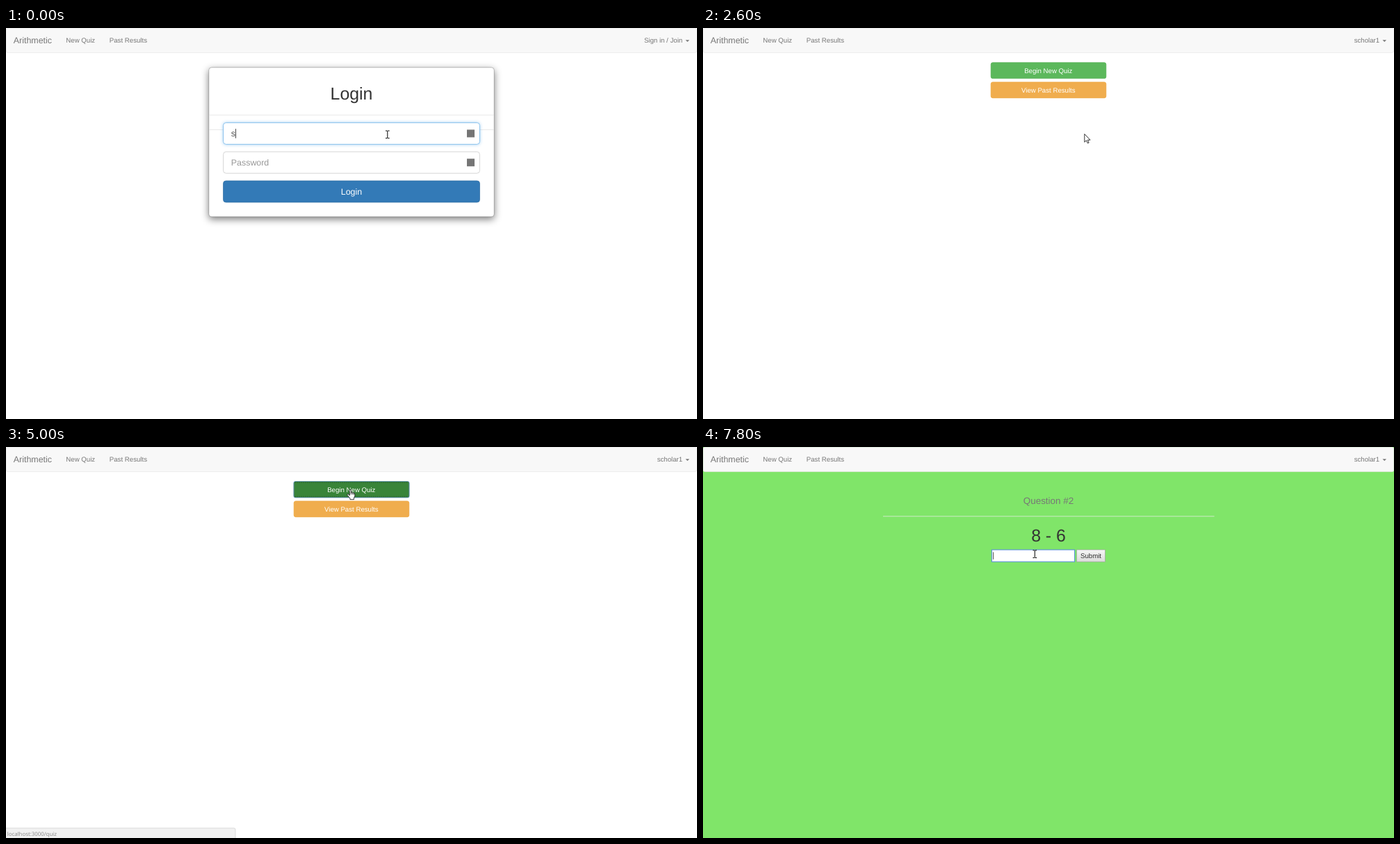
An HTML page for the animation above (8000 ms loop, 994 by 563 pixels).

```html
<!DOCTYPE html>
<html lang="en">
<head>
<meta charset="utf-8">
<title>Arithmetic</title>
<style>
html, body { margin: 0; width: 100%; height: 100%; overflow: hidden; background: #fff; }
svg { display: block; width: 100%; height: 100%; }
text { font-family: "Liberation Sans", Arial, sans-serif; font-size: 9.66px; text-rendering: geometricPrecision; white-space: pre; }
.nav { fill: #777; }
.lg { font-size: 12.42px; }
.h1 { font-size: 24.85px; fill: #333; }
.mid { text-anchor: middle; }
.end { text-anchor: end; }
.white { fill: #fff; }
.field { fill: #555; }
.hint { fill: #999; }
.answer { fill: #333; }
.status { font: 7.85px "Open Sans", "Noto Sans", sans-serif; fill: #858585; }
rect, path { stroke-width: .7; }
</style>
</head>
<body>
<svg viewBox="0 0 994 563">
  <defs>
    <filter id="soft" x="-10%" y="-20%" width="120%" height="140%"><feGaussianBlur stdDeviation="5.2"/></filter>
    <filter id="glow" x="-5%" y="-50%" width="110%" height="200%"><feGaussianBlur stdDeviation="2.7"/></filter>
    <linearGradient id="grey" x2="0" y2="1"><stop stop-color="#f6f6f6"/><stop offset="1" stop-color="#dcdcdc"/></linearGradient>
  </defs>

  <rect id="page" width="994" height="563"/>
  <rect x=".35" y=".35" width="993.3" height="35.2" rx="2.6" fill="#f8f8f8" stroke="#e7e7e7"/>
  <g class="nav">
    <text class="lg" x="10.8" y="22.1">Arithmetic</text>
    <text x="86.3" y="21.4">New Quiz</text>
    <text x="148.8" y="21.4">Past Results</text>
    <text id="account" class="end" x="973.2" y="21.4"></text>
    <path d="M977.5 17.2h5.6l-2.8 2.8z"/>
  </g>

  <g id="login">
    <rect x="291.5" y="60" width="411" height="215.5" rx="4" opacity=".5" filter="url(#soft)"/>
    <rect x="291.8" y="56.8" width="410.4" height="215" rx="4" fill="#fff" stroke="#000" stroke-opacity=".35"/>
    <text class="h1 mid" x="497" y="103">Login</text>
    <path d="M292.2 125.3H701.8M292.2 146.5H701.8" stroke="#e0e0e0"/>
    <g id="user"></g>
    <g id="pass"></g>
    <rect x="312.5" y="220" width="369" height="31" rx="4" fill="#337ab7" stroke="#2e6da4"/>
    <text class="lg white mid" x="497" y="239.8">Login</text>
  </g>

  <g id="home">
    <rect id="begin" x="414.2" y="49.8" width="165.6" height="22.8" rx="2.6"/>
    <g id="ring" fill="none">
      <path d="M416 51.2H578M416 71.2H578" stroke="#205020" stroke-dasharray="1.4 1.4"/>
      <rect x="414" y="49.6" width="166" height="23.2" rx="1.6" stroke="#5b95c8" stroke-width="1"/>
    </g>
    <text class="white mid" x="496.8" y="64.6">Begin New Quiz</text>
    <rect id="view" x="414.2" y="77.9" width="165.6" height="22.8" rx="2.6"/>
    <text class="white mid" x="496.8" y="92.7">View Past Results</text>
  </g>

  <g id="quiz">
    <text id="title" class="nav mid" x="497" y="81.6" style="font-size:13.46px"></text>
    <path d="M259 99.8H735.5" stroke="#eee" stroke-width=".8"/>
    <text id="sum" class="h1 mid" x="497" y="136"></text>
    <rect id="box" x="415.4" y="148" width="119.2" height="17.2" fill="#fff"/>
    <text id="answer" class="answer" x="417.2" y="160"></text>
    <rect x="537.6" y="148" width="40.8" height="17.2" fill="url(#grey)" stroke="#a2a2a2"/>
    <text class="answer mid" x="558" y="160">Submit</text>
  </g>

  <path id="caret" stroke="#333" style="stroke-width:.9"/>
  <g id="status">
    <path d="M-1 564V548.8H328a2 2 0 0 1 2 2V564Z" fill="#f1f1f1" stroke="#cfcfcf"/>
    <text class="status" x="1.8" y="559.6">localhost:3000/quiz</text>
  </g>

  <g id="cursor" stroke="#000">
    <path id="beam" d="M-2.8-5.2H-.7L0-4.6L.7-5.2H2.8M0-4.6V4.9M-2.8 5.5H-.7L0 4.9L.7 5.5H2.8" fill="none" style="stroke-width:1"/>
    <path id="arrow" d="M0 0V11.7L2.7 9.2L4.5 13.3L6.3 12.5L4.6 8.6H8.2Z" fill="#fff" style="stroke-width:.8"/>
    <path id="hand" transform="scale(.69) translate(-7 0)" d="M5.5 13V2a1.5 1.5 0 0 1 3 0V7.5a1.5 1.5 0 0 1 3 0V8a1.4 1.4 0 0 1 2.7.3V9a1.2 1.2 0 0 1 2.3.5V14.5L14.5 18V21.5H6.5V19L1 12.5a1.5 1.5 0 0 1 2.3-2ZM8.5 7.5V11M11.5 8V11M14.2 9V11.5" fill="#fff" style="stroke-width:1.1"/>
  </g>
</svg>
<script>
const LOOP = 8000, STEP = 200, NAME = 'scholar1';
const $ = id => document.getElementById(id);
const show = (id, on) => { $(id).style.display = on ? '' : 'none'; };
const set = (id, attrs) => { for (const k in attrs) $(id).setAttribute(k, attrs[k]); };

// Latest value whose start time has passed
const at = (t, list) => list.reduce((v, [start, value]) => t >= start ? value : v, null);

const userLength = [[0, 1], [200, 3], [400, 5], [600, 7], [1200, 8]];
const passLength = [[0, 0], [1600, 1], [1800, 3], [2000, 4], [2200, 6]];
const pointer = [[0, 'beam'], [2600, 'arrow'], [4200, 'hand'], [5200, 'arrow'], [6200, 'beam']];
const statusAlpha = [[0, 0], [4600, .5], [4800, 1], [5600, .15], [5800, 0]];
const beginColor = [[0, ['#5cb85c', '#4cae4c']], [4400, ['#449d44', '#398439']], [5000, ['#398439', '#255625']]];
const viewColor = [[0, ['#f0ad4e', '#eea236']], [4200, ['#ec971f', '#d58512']], [4400, ['#f0ad4e', '#eea236']]];
const route = [[0, 548.8, 153.2], [3200, 548.8, 152.5], [4000, 455.5, 111.2], [4400, 488, 67],
  [4600, 495.3, 60.8], [5000, 495.3, 60.8], [5200, 495.2, 64.8], [5600, 495.2, 64.8], [6200, 477.3, 154]];

function place(t) {
  const i = route.findIndex(p => p[0] > t);
  if (i < 0) return route[route.length - 1].slice(1);
  const [t0, x0, y0] = route[i - 1], [t1, x1, y1] = route[i];
  const k = (t - t0) / (t1 - t0);
  return [x0 + (x1 - x0) * k, y0 + (y1 - y0) * k];
}

function buildField(id, y) {
  const frame = `x="312.6" y="${y}" width="368.8" height="31" rx="4"`;
  $(id).innerHTML = `<rect id="${id}Glow" ${frame} fill="#66afe9" opacity=".7" filter="url(#glow)"/>
    <rect id="${id}Box" ${frame} fill="#fff"/>
    <text id="${id}Text" class="lg" x="323.8" y="${y + 19.8}"></text>
    <rect x="663" y="${y + 10}" width="11" height="11" fill="#757575"/>`;
}

function drawField(id, value, hint, focus) {
  show(id + 'Glow', focus);
  set(id + 'Box', { stroke: focus ? '#66afe9' : '#c4c4c4' });
  set(id + 'Text', { class: 'lg ' + (value ? 'field' : 'hint') });
  $(id + 'Text').textContent = value || hint;
}

function drawCaret(textId, empty, top, height) {
  const text = $(textId);
  const x = +text.getAttribute('x') + (empty ? 0 : text.getComputedTextLength()) + .5;
  set('caret', { d: `M${x} ${top}v${height}` });
}

function drawLogin(t) {
  const onPass = t >= 1400, dots = at(t, passLength);
  drawField('user', NAME.slice(0, at(t, userLength)), 'Username', !onPass);
  drawField('pass', '•'.repeat(dots), 'Password', onPass);
  if (onPass) drawCaret('passText', !dots, 187, 13.5);
  else drawCaret('userText', false, 145.2, 13.5);
}

function drawHome(t) {
  for (const [id, colors] of [['begin', beginColor], ['view', viewColor]]) {
    const [fill, stroke] = at(t, colors);
    set(id, { fill, stroke });
  }
  show('ring', t >= 5000);
}

function drawQuiz(t) {
  const next = t >= 7800, focus = t >= 6600;
  $('title').textContent = next ? 'Question #2' : 'Question #1';
  $('sum').textContent = next ? '8 - 6' : '8 x 2';
  $('answer').textContent = at(t, [[0, ''], [7200, '1'], [7400, '16'], [7800, '']]);
  set('box', { stroke: focus ? '#5a91d8' : '#9c9c9c', style: `stroke-width:${focus ? 1.1 : .8}` });
  if (focus) drawCaret('answer', !$('answer').textContent, 151.4, 10.4);
}

function draw(time) {
  const t = Math.floor((time % LOOP) / STEP) * STEP;
  const scene = at(t, [[0, 'login'], [2600, 'home'], [5200, 'quiz']]);
  for (const id of ['login', 'home', 'quiz']) show(id, id === scene);
  ({ login: drawLogin, home: drawHome, quiz: drawQuiz })[scene](t);

  show('caret', scene === 'login' || t >= 6600);
  set('page', { fill: t >= 7800 ? '#80e569' : '#fff' });
  $('account').textContent = scene === 'login' ? 'Sign in / Join' : NAME;
  set('status', { opacity: at(t, statusAlpha) });

  const kind = at(t, pointer);
  for (const id of ['beam', 'arrow', 'hand']) show(id, id === kind);
  set('cursor', { transform: `translate(${place(t)})` });
}

buildField('user', 136.4);
buildField('pass', 178.2);
const begun = performance.now();
function tick() {
  draw(performance.now() - begun);
  requestAnimationFrame(tick);
}
tick();
</script>
</body>
</html>
```
